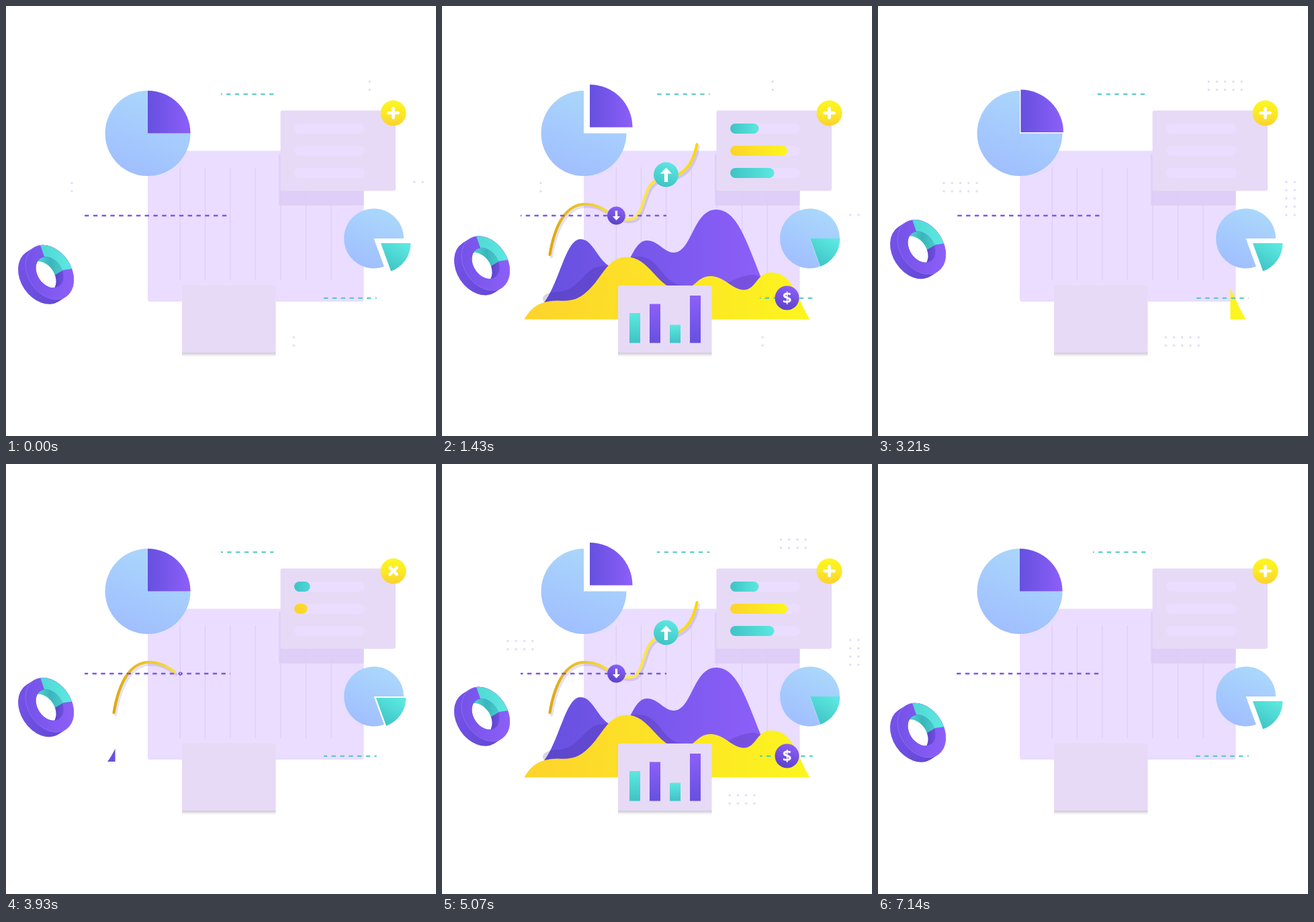
An HTML page with a canvas that plays this animation: 640x640 px, repeating every 7210 ms.

```html
<!DOCTYPE html>
<html lang="en">
<head>
<meta charset="utf-8">
<title>Charts</title>
<style>
  html, body { margin: 0; width: 100%; height: 100%; overflow: hidden; background: #fff; }
  canvas { display: block; width: 100vw; height: 100vh; }
</style>
</head>
<body>
<canvas id="stage" width="640" height="640"></canvas>
<script>
const ctx = document.getElementById('stage').getContext('2d');
const LOOP = 7210, STEP = 71.4, SPAN = 7140;
const HALF = SPAN / 2, THIRD = SPAN / 3;
const TAU = Math.PI * 2, RAD = Math.PI / 180;

const PURPLE = ['#6650e0', '#8c5ff8'];
const TEAL = ['#3fc3c5', '#5ce8e0'];
const YELLOW = ['#fdd32c', '#fcf51f'];
const SKY = ['#a0beff', '#abd8fb'];

const clamp = v => Math.max(0, Math.min(1, v));
const ease = (t, start, dur) => (1 - Math.cos(Math.PI * clamp((t - start) / dur))) / 2;

function grad(x0, y0, x1, y1, colors) {
  const g = ctx.createLinearGradient(x0, y0, x1, y1);
  colors.forEach((c, i) => g.addColorStop(i / (colors.length - 1), c));
  return g;
}

function box(x, y, w, h, r, fill) {
  if (w <= 0 || h <= 0) return;
  ctx.fillStyle = fill;
  ctx.beginPath();
  ctx.roundRect(x, y, w, h, Math.min(r, w / 2, h / 2));
  ctx.fill();
}

function disc(x, y, r, fill) {
  ctx.fillStyle = fill;
  ctx.beginPath();
  ctx.arc(x, y, r, 0, TAU);
  ctx.fill();
}

function sector(x, y, r, from, to, fill) {
  ctx.fillStyle = fill;
  ctx.beginPath();
  ctx.moveTo(x, y);
  ctx.arc(x, y, r, from * RAD, to * RAD);
  ctx.fill();
}

function dashes(x0, x1, y, width, color, shift) {
  ctx.save();
  ctx.strokeStyle = color;
  ctx.lineWidth = width;
  ctx.setLineDash([6.4, 6.4]);
  ctx.lineDashOffset = -shift;
  ctx.beginPath();
  ctx.moveTo(x0, y);
  ctx.lineTo(x1, y);
  ctx.stroke();
  ctx.restore();
}

function panels() {
  box(211, 215.5, 321.5, 224.5, 3, '#eaddff');
  box(406, 220, 126.5, 77, 2, '#dfcff8');
  ctx.fillStyle = '#dccbf7';
  for (let i = 0; i < 7; i++) ctx.fillRect(258.8 + i * 37.45 - (i > 0 && i < 4 ? 0.4 : 0), 240, 1, 168);
}

function pies(h) {
  const g = (x, y, r) => grad(x - r * 0.4, y + r, x + r * 0.4, y - r, SKY);
  sector(211, 189.5, 63.5, 0, 270, g(211, 189.5, 63.5));
  const a = 9 * (ease(h, 450, 560) - ease(h, 2800, 560));
  sector(211 + a, 189.5 - a, 63.5, -90, 0, grad(211 + a, 0, 274 + a, 0, PURPLE));

  sector(547.5, 346, 44.5, 70, 360, g(547.5, 346, 44.5));
  const b = 1 - ease(h, 0, 560) + ease(h, 1900, 560);
  const x = 547.8 + 10 * b, y = 346 + 7 * b;
  sector(x, y, 44.5, 0, 70, grad(x + 10, y + 40, x + 34, y, TEAL));
}

function progress(h) {
  box(408.5, 155.5, 171.5, 119.5, 3, '#e7daf6');
  const rows = [
    { w: 42.5, c: TEAL, on: [0, 667], off: [2319, 330] },
    { w: 85, c: YELLOW, on: [138, 690], off: [2060, 890] },
    { w: 65.5, c: TEAL, on: [350, 690], off: [2310, 690] }
  ];
  rows.forEach((r, i) => {
    const y = 175 + i * 33;
    box(429, y, 104.5, 15, 7.5, '#eaddff');
    const w = r.w * (ease(h, ...r.on) - ease(h, ...r.off));
    if (w > 0.5) box(429, y, w, 15, 7.5, grad(429, 0, 429 + r.w, 0, r.c));
  });

  disc(576.5, 159.5, 19, grad(0, 141, 0, 178, ['#fdf61f', '#fde926', '#fbd231']));
  ctx.save();
  ctx.translate(576.5, 159.3);
  ctx.rotate(Math.PI / 2 * (ease(h, 0, 720) + ease(h, 1900, 700)));
  box(-9.3, -2.3, 18.6, 4.6, 2, '#fff');
  box(-2.3, -9.3, 4.6, 18.6, 2, '#fff');
  ctx.restore();
}

const HILLS = new Path2D('M151 443C175 412 184 347 206 347C228 347 232 388 262 392C280 392 284 349 305 349' +
  'C322 349 330 367 345 367C372 367 374 303 408 303C446 303 458 372 492 443Z');
const SHADE = new Path2D('M152 441C145 429 160 426 176 425C206 422 212 387 240 387C258 387 268 373 293 373' +
  'C325 373 328 416 360 416C392 416 395 420 425 412C445 402 455 400 465 400Q472 401 474 404V441Z');
const DUNES = new Path2D('M122.5 466.5C134 446 148 439 172 438.5C196 440 208 436 228 412C242 394 252 373.5 275 373.5' +
  'C308 373.5 320 418 352 424C376 424 378 402 400 402C420 402 432 422.5 449 422.5C468 422.5 468 396.5 490 396.5' +
  'C522 396.5 528 434 547.5 466.5Z');

// Reveals content left to right, then hides it the same way.
function wipe(x, w, on, off, draw) {
  if (on <= off) return;
  ctx.save();
  ctx.beginPath();
  ctx.rect(x + w * off, 280, w * (on - off), 200);
  ctx.clip();
  draw();
  ctx.restore();
}

function mountains(h) {
  wipe(150, 326, ease(h, 254, 820), ease(h, 2220, 820), () => {
    ctx.fillStyle = grad(151, 0, 474, 0, PURPLE);
    ctx.fill(HILLS);
  });
  wipe(122, 426, ease(h, 550, 820), ease(h, 2517, 820), () => {
    ctx.fillStyle = 'rgba(45,30,115,0.19)';
    ctx.fill(SHADE);
    ctx.fillStyle = grad(122, 0, 547, 0, YELLOW);
    ctx.fill(DUNES);
  });
}

const CURVE = [
  [160.5, 370, 168, 325, 185, 295, 213, 295],
  [213, 295, 238, 295, 250, 312, 262, 315],
  [262, 315, 272, 318, 284, 320, 290, 313],
  [290, 313, 304, 296, 300, 262, 325, 258],
  [325, 258, 355, 255, 372, 243, 379.5, 206]
];
const TREND = new Path2D();
let trendLen = 0;
CURVE.forEach((c, i) => {
  if (!i) TREND.moveTo(c[0], c[1]);
  TREND.bezierCurveTo(...c.slice(2));
  const at = (k, t) => {
    const s = 1 - t;
    return s * s * s * c[k] + 3 * s * s * t * c[k + 2] + 3 * s * t * t * c[k + 4] + t * t * t * c[k + 6];
  };
  for (let n = 0; n < 40; n++) {
    const t = n / 40, u = (n + 1) / 40;
    trendLen += Math.hypot(at(0, u) - at(0, t), at(1, u) - at(1, t));
  }
});

function trend(h) {
  const on = ease(h, 20, 750), off = ease(h, 2070, 700);
  if (on - off < 0.002) return;
  ctx.save();
  ctx.lineWidth = 4.2;
  ctx.lineCap = 'round';
  ctx.setLineDash([trendLen * (on - off), 2000]);
  ctx.lineDashOffset = -trendLen * off;
  ctx.translate(2.5, 3.5);
  ctx.strokeStyle = 'rgba(60,30,130,0.13)';
  ctx.stroke(TREND);
  ctx.translate(-2.5, -3.5);
  ctx.strokeStyle = grad(160, 0, 380, 0, ['#dfa80c', '#eec92e', '#fbe955', '#fae23a', '#f9d70c']);
  ctx.stroke(TREND);
  ctx.restore();
}

function coin(x, y, r, scale, colors, face) {
  if (scale < 0.01) return;
  ctx.save();
  ctx.translate(x, y);
  ctx.scale(scale, scale);
  disc(0, 0, r, grad(-r * 0.3, r, r * 0.3, -r, colors));
  ctx.fillStyle = '#fff';
  face();
  ctx.restore();
}

// Arrow pointing up, or down when k is negative.
function arrow(k) {
  ctx.beginPath();
  [[0, -10.5], [8.5, -1.5], [2.6, -1.5], [2.6, 11], [-2.6, 11], [-2.6, -1.5], [-8.5, -1.5]]
    .forEach(([x, y]) => ctx.lineTo(x * k, y * k));
  ctx.fill();
}

function coins(h) {
  const pop = (on, off) => ease(h, on, 205) - ease(h, off, 205);
  coin(259.5, 312, 13.4, pop(297, 2355), ['#5b42c8', '#8c5ff8'], () => arrow(-0.66));
  coin(333.5, 251, 18.5, pop(520, 2440), TEAL, () => arrow(1));
  coin(513.5, 434.5, 18, pop(800, 2950), ['#5b42c8', '#8c5ff8'], () => {
    ctx.font = 'bold 24px "Open Sans", sans-serif';
    ctx.textAlign = 'center';
    ctx.fillText('$', 0, 8.5);
  });
}

function barCard(h) {
  ctx.fillStyle = grad(0, 515, 0, 522, ['rgba(70,60,90,0.32)', 'rgba(70,60,90,0)']);
  ctx.fillRect(262, 515, 139.5, 7);
  box(262, 416, 139.5, 100, 2, '#e7daf6');
  [44.5, 58, 27, 70.5].forEach((full, i) => {
    const size = full * (ease(h, 450 + 75 * i, 510) - ease(h, 2327 + 72 * i, 510));
    ctx.fillStyle = grad(0, 501.5, 0, 501.5 - full, i % 2 ? PURPLE : TEAL);
    ctx.fillRect(279 + 30 * i, 501.5 - size, 16, size);
  });
}

function dots(t) {
  for (let i = 0; i < 5; i++) {
    if (t < 83 * i || t >= 1160 + 83 * i) continue;
    const d = 12.25 * i;
    for (let row = 0; row < 2; row++) {
      const e = 12.3 * row;
      [[541.2 - d, 112.5 + e], [98 + d, 263.5 + e], [428.2 + d, 493 + e], [607.7 + e, 262 + d]]
        .forEach(([x, y]) => disc(x, y, 1.8, '#e6dcfb'));
    }
  }
}

function donut(t) {
  const oval = (x, y, k) => {
    ctx.moveTo(x + 43.7 * k * Math.cos(56.5 * RAD), y + 43.7 * k * Math.sin(56.5 * RAD));
    ctx.ellipse(x, y, 43.7 * k, 32.1 * k, 56.5 * RAD, 0, TAU);
  };
  const wedge = () => {
    ctx.beginPath();
    ctx.moveTo(0, 0);
    ctx.arc(0, 0, 90, -109 * RAD, -9 * RAD);
    ctx.clip();
  };
  const INNER = 0.57, dx = -11, dy = 7;
  ctx.save();
  ctx.translate(65, 377 + 19.3 * Math.cos(TAU * t / SPAN));

  // Outer wall
  ctx.fillStyle = grad(-47, 0, 25, 40, ['#7452e8', '#6148d4']);
  for (let i = 0; i <= 11; i++) {
    ctx.beginPath();
    oval(dx * i / 11, dy * i / 11, 1);
    ctx.fill();
  }

  // Inner wall with the hole
  ctx.save();
  ctx.beginPath();
  oval(0, 0, INNER);
  ctx.clip();
  ctx.fillStyle = grad(5, 0, 21, 0, ['#5a42c6', '#6d50e0']);
  ctx.fillRect(-30, -30, 60, 60);
  ctx.fillStyle = grad(-18, 0, 20, 0, ['#4ed4d2', '#38b6ba', '#48ccca']);
  ctx.beginPath();
  ctx.moveTo(-30, -30);
  ctx.lineTo(30, -30);
  ctx.lineTo(30, -8);
  ctx.lineTo(20, -3);
  ctx.lineTo(8, 4);
  ctx.lineTo(-30, -6);
  ctx.fill();
  ctx.fillStyle = '#fff';
  ctx.beginPath();
  oval(dx, dy, INNER);
  ctx.fill();
  ctx.restore();

  // Front face
  const face = fill => {
    ctx.fillStyle = fill;
    ctx.beginPath();
    oval(0, 0, 1);
    oval(0, 0, INNER);
    ctx.fill('evenodd');
  };
  face(grad(-36, 0, 36, 0, ['#7553e8', '#8c5ff8']));
  ctx.save();
  wedge();
  face(grad(-14, 0, 32, 0, ['#50d8d4', '#5ce8e0']));
  ctx.restore();
  ctx.strokeStyle = 'rgba(185,160,255,0.55)';
  ctx.lineWidth = 0.6;
  ctx.beginPath();
  oval(0, 0, 1);
  ctx.stroke();
  ctx.restore();
}

function draw(now) {
  const step = Math.floor((now % LOOP + 5) / STEP) % 101;
  const t = Math.min(step * STEP, SPAN - 0.01);
  const h = t % HALF, third = t % THIRD;
  const shift = 12.8 * (18 * t / SPAN % 1);

  ctx.fillStyle = '#fff';
  ctx.fillRect(0, 0, 640, 640);
  dots(third);
  panels();
  pies(h);
  progress(h);
  trend(h);
  dashes(117, 334, 312, 2.5, '#7d55ea', shift);
  dashes(398.3, 319.8, 131.2, 2, '#48c8c2', shift);
  mountains(h);
  dashes(473, 551.6, 434.8, 2, '#48c8c2', shift);
  coins(h);
  barCard(h);
  donut(t);
}

const begin = performance.now();
function tick() {
  draw(performance.now() - begin);
  requestAnimationFrame(tick);
}
tick();
</script>
</body>
</html>
```
